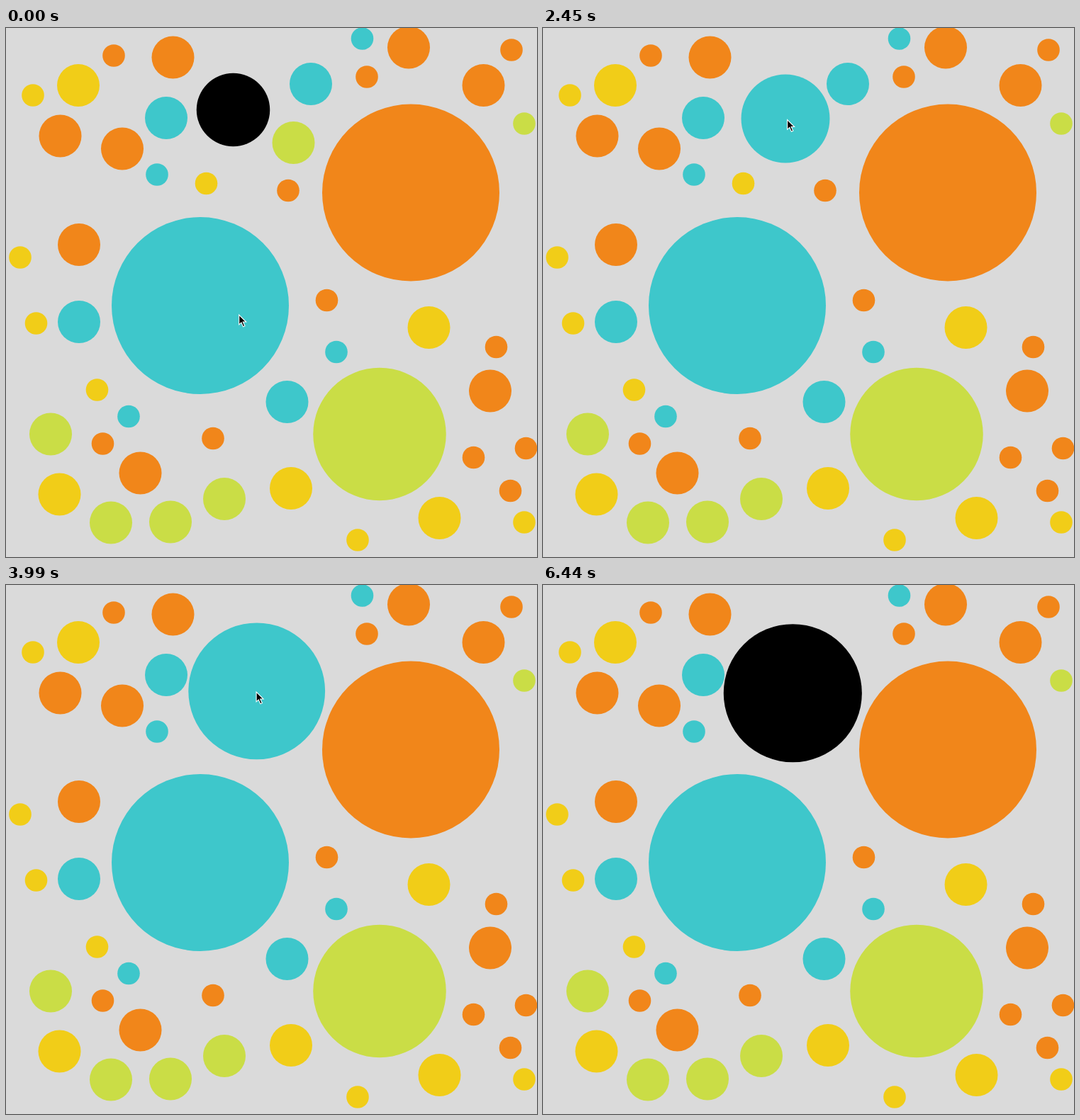
Animation of 749x747 px, one loop 6.58 s. Source, as an HTML page:

```html
<!DOCTYPE html>
<html lang="en">
<head>
<meta charset="utf-8">
<title>Growing circle</title>
<style>
  html, body { margin: 0; width: 100%; height: 100%; overflow: hidden; background: #dadada; }
  svg { display: block; width: 749px; height: 747px; }
  .orange { fill: #f1861a; }
  .teal { fill: #3ec7cb; }
  .yellow { fill: #f1cd18; }
  .lime { fill: #cadd46; }
</style>
</head>
<body>
<svg viewBox="0 0 749 747">
  <g id="dots"></g>
  <circle id="hero"/>
  <path id="cursor" d="M0 0V13.8L3.2 10.9L5.8 16.8L8.2 15.7L5.6 10H10Z" fill="#000" stroke="#fff" stroke-width="1.1"/>
</svg>
<script>
const LOOP = 6580, STEP = 70;
const HERO_R = 51.75, GROW = 350, LEAD = 90;
const GRAB = 1120, HELD = 1260, LEAVE = 5040, GONE = 5460;

const $ = id => document.getElementById(id);
const set = (el, attrs) => { for (const k in attrs) el.setAttribute(k, attrs[k]); };
const ramp = (t, from, to) => Math.min(1, Math.max(0, (t - from) / (to - from)));
const mix = (a, b, k) => a.map((v, i) => v + (b[i] - v) * k);

const dots = [];
function scatter(color, r, spots) {
  for (const spot of spots.split(' ')) {
    const [x, y] = spot.split(',').map(Number);
    const el = document.createElementNS('http://www.w3.org/2000/svg', 'circle');
    set(el, { cx: x, cy: y, r, class: color });
    $('dots').append(el);
    dots.push({ el, x, y, r, eatenAt: Infinity });
  }
}

const BIG = 125, MID = 30, SMALL = 15.8;
scatter('orange', BIG, '571,232.5');
scatter('teal', BIG, '274,392');
scatter('lime', BIG * 0.75, '527,573.5');
scatter('orange', MID, '235.5,41.5 76.5,152.5 164,170.5 568,27.5 673.5,81 103,306 683,512.5 189.5,628.5');
scatter('teal', MID, '226,127 430,79 103,415 396.5,528');
scatter('yellow', MID, '102,81 596.5,423 75.5,658.5 402,650 611.5,692');
scatter('lime', MID, '405.5,162 63,573.5 148,698.5 232,697.5 308,665');
scatter('orange', SMALL, '152,39 509,69 713,31 398,229.5 452.5,384.5 691.5,450.5 659.5,606.5 733.5,593.5 711.5,653.5 136.5,587 292,579.5');
scatter('teal', SMALL, '502.5,15 213,207 466,457.5 173,548.5');
scatter('yellow', SMALL, '38,95 282.5,219.5 20,324 42.5,417 128.5,511 496,723 731,698');
scatter('lime', SMALL, '731,135');

// Drag route: time, then position
const route = [
  [GRAB, 320.5, 115.5], [HELD, 314.5, 109.5], [1610, 315, 110], [2450, 342, 128],
  [2700, 349.2, 132.2], [2940, 353, 134], [3200, 357.5, 137.7], [3640, 356, 145], [4200, 352.3, 152.7]
];

function heroAt(t) {
  let p = route[0].slice(1);
  for (let i = 1; i < route.length; i++) {
    p = mix(p, route[i].slice(1), ramp(t, route[i - 1][0], route[i][0]));
  }
  return p;
}

// Each swallowed dot adds half its radius
const fed = (dot, t) => ramp(t, dot.eatenAt, dot.eatenAt + GROW);
const radiusAt = t => dots.reduce((r, dot) => dot.eatenAt < t ? r + dot.r / 2 * fed(dot, t) : r, HERO_R);

for (let t = GRAB; t < LEAVE; t += 5) {
  const [x, y] = heroAt(t), reach = radiusAt(t);
  for (const dot of dots) {
    if (dot.eatenAt > t && Math.hypot(dot.x - x, dot.y - y) < reach + dot.r) dot.eatenAt = t;
  }
}
const meals = dots.filter(dot => dot.eatenAt < LOOP);

// The pointer comes in three short bursts, slowing down
function approach(t) {
  const p = Math.min(1, (Math.floor(t / 350) + ramp(t % 350, 0, 210)) / 3);
  return mix([328.7, 405], [309, 102], 1 - (1 - p) ** 2);
}

function pointerAt(t) {
  const dragged = mix(approach(t), heroAt(t + LEAD), ramp(t, GRAB, HELD));
  return mix(dragged, [765, 140], ramp(t, LEAVE, GONE));
}

function draw(t) {
  const [cx, cy] = heroAt(t);
  const growing = meals.some(dot => t > dot.eatenAt && fed(dot, t) < 1);
  set($('hero'), { cx, cy, r: radiusAt(t), class: growing ? 'teal' : '' });
  set($('cursor'), { transform: `translate(${pointerAt(t)})` });
  for (const dot of meals) dot.el.style.display = t >= dot.eatenAt ? 'none' : '';
}

const start = performance.now();
function tick() {
  const t = (performance.now() - start) % LOOP;
  draw(Math.min(Math.floor(t / STEP) * STEP, LOOP - 2 * STEP));
  requestAnimationFrame(tick);
}
tick();
</script>
</body>
</html>
```
